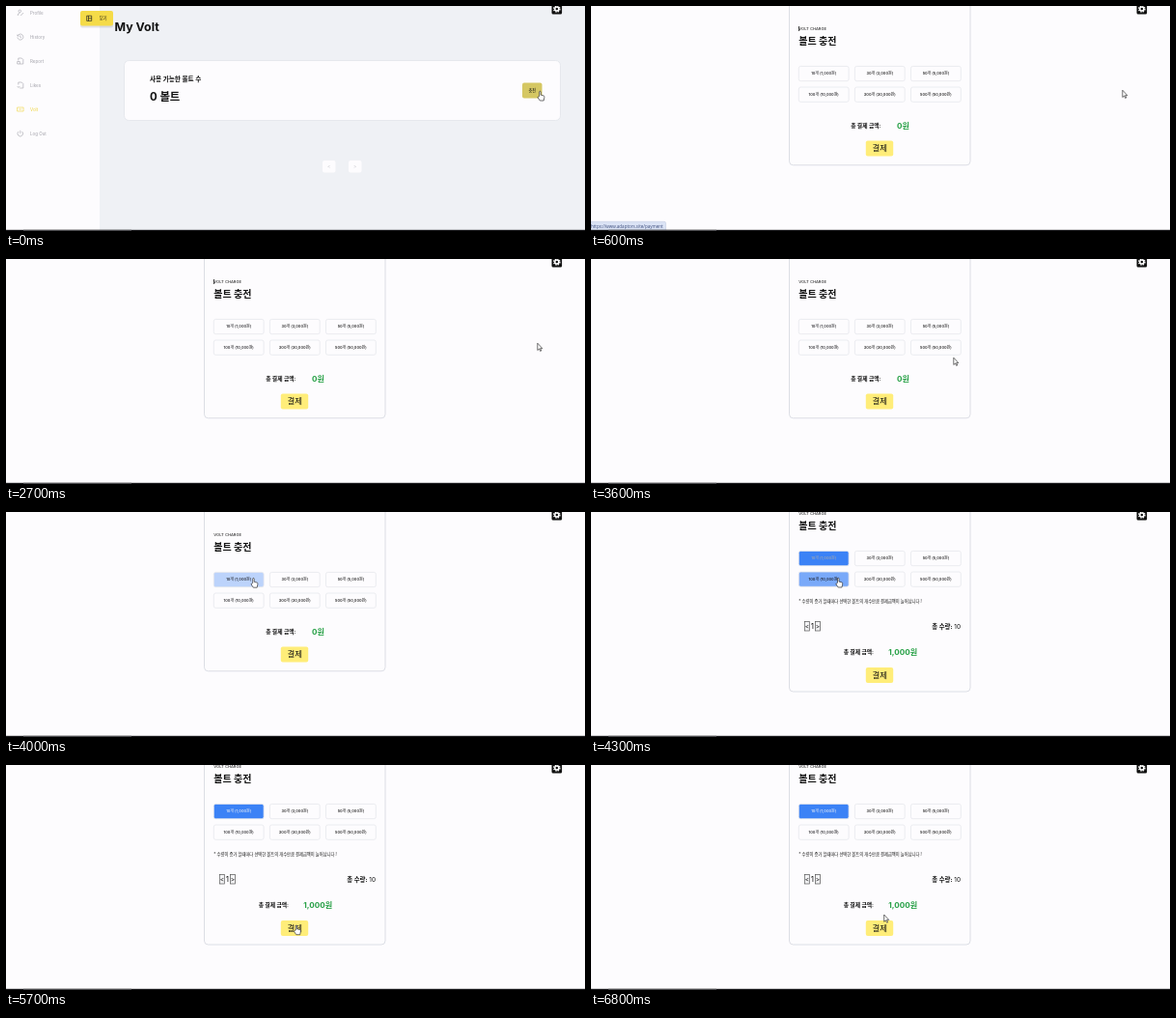
An HTML page for the animation above (8 s loop, 600 px wide and 233 px high).

```html
<!DOCTYPE html>
<html lang="ko">
<head>
<meta charset="utf-8">
<title>My Volt</title>
<style>
html, body { margin: 0; height: 100%; overflow: hidden; background: #fdfcfe; }
svg { display: block; width: 600px; height: 233px; font-family: Inter, 'Noto Sans CJK KR', 'Noto Sans CJK', sans-serif; }
</style>
</head>
<body>
<svg id="stage" viewBox="0 0 600 233"></svg>
<script>
const LOOP = 8000, STEP = 100;
const PAGE_AT = 500, CLICK_AT = 4200;
const BLUE = [59, 130, 246], WHITE = [253, 252, 254], INK = [20, 20, 24];

const text = (x, cy, size, str, attrs = '') =>
  `<text x="${x}" y="${cy + size * .36}" font-size="${size}" fill="#111" ${attrs}>${str}</text>`;
const box = (x, y, w, h, r, fill, stroke = 'none', attrs = '') =>
  `<rect x="${x}" y="${y}" width="${w}" height="${h}" rx="${r}" fill="${fill}" stroke="${stroke}" ${attrs}/>`;
const line = (d, attrs = '') => `<path d="${d}" fill="none" ${attrs}/>`;
const BOLD = 'font-weight="700"', MID = 'text-anchor="middle"';

// Account page
const menu = [
  ['Profile', 'M1 6.5V5.5q0-1.5 2-1.5M3 .5a1.3 1.3 0 1 1 0 2.6a1.3 1.3 0 1 1 0-2.6M4 6.5L6.8 3.5'],
  ['History', 'M.6 1V2.6H2.2M.8 2.4A3 3 0 1 1 .6 4M3.5 2V3.8L4.8 4.5'],
  ['Report', 'M1.5 3V.5H5L6.5 2V6.5H3M.4 4H3V6.5H.4Z'],
  ['Likes', 'M1.5 3V.5H5L6.5 2V6.5H3M.4 4.5L1.7 6L3 4.5'],
  ['Volt', 'M.3 1.5H6.8V5.5H.3ZM3.5 2.5V4.5M1.5 3.5H2M5 3.5H5.6'],
  ['Log Out', 'M3.5 .3V3.4M1.7 1.5A2.8 2.8 0 1 0 5.3 1.5'],
];
const menuItem = ([label, icon], i) => {
  const cy = 7 + i * 25, color = label === 'Volt' ? '#efd53f' : '#a2a2aa';
  return line(icon, `transform="translate(11.3 ${cy - 3.5})" stroke="${color}" stroke-width=".6"`) +
    text(25, cy, 4.5, label, `style="fill:${color}"`);
};
const pager = (x, sign) => box(x, 160, 13.5, 12.5, 2, '#fdfcfe') +
  text(x + 6.75, 166.2, 5, sign, MID + ' style="fill:#c9c9cf"');

const account = `<g id="account">
  ${box(0, 0, 600, 233, 0, '#eff1f5')}
  ${box(0, 0, 97, 233, 0, '#fdfcfe')}
  ${menu.map(menuItem).join('')}
  ${box(77, 6.5, 34, 16, 2, '#000', 'none', 'opacity=".1"')}
  ${box(77, 5, 34, 15.5, 2, '#f5db48')}
  ${line('M83.7 10.2H88.7V15.4H83.7ZM85.5 10.2V15.4M85.5 12.8H88.7', 'stroke="#222" stroke-width=".7"')}
  ${text(97, 12.8, 4.2, '닫기')}
  ${text(112.5, 21.5, 12.4, 'My Volt', BOLD)}
  ${box(122.5, 56.5, 452, 62, 5, '#fdfcfe', '#e0e3e8', 'stroke-width=".7"')}
  ${text(149, 76, 6.6, '사용 가능한 볼트 수', BOLD)}
  ${text(149, 94, 11.4, '0 볼트', BOLD)}
  ${box(535, 79.5, 20.5, 16, 2, '#d5c762')}
  ${text(545.3, 87, 4.2, '충전', MID)}
  ${pager(328, '&lt;')}${pager(355, '&gt;')}
</g>`;

// Payment page
const amounts = [[10, '1,000'], [30, '3,000'], [50, '5,000'], [100, '10,000'], [300, '30,000'], [500, '50,000']];
const option = ([n, won], i) => {
  const x = 215.3 + i % 3 * 58.1, y = i < 3 ? 62.4 : 84;
  return `<g class="option">${box(x, y, 51.8, 15.3, 2, '#fdfcfe', '#e6e8ec', 'stroke-width=".8"')}` +
    text(x + 25.9, y + 7.6, 4, `${n}개 (${won}원)`, MID + ' font-weight="500"') + '</g>';
};
const stepper = (x, sign) => box(x, 113.4, 5, 9.6, 0, '#f4f4f6', '#555', 'stroke-width=".7"') +
  text(x + 2.5, 118.2, 6.5, sign, MID);

const payment = `<g id="payment">
  <rect id="card" x="205.5" y="-30" width="187.5" rx="4" fill="#fdfcfe" stroke="#d9dbe2" stroke-width=".9"/>
  <g id="top">
    ${text(215.3, 23.2, 4.1, 'VOLT CHARGE', 'font-weight="500" style="fill:#333"')}
    ${box(215, 21, .8, 5, 0, '#111', 'none', 'id="caret"')}
    ${text(215.3, 36.2, 10, '볼트 충전', BOLD)}
    ${amounts.map(option).join('')}
  </g>
  <g id="count">
    ${text(215.3, 92.6, 4.25, '* 수량이 증가 할때마다 선택한 볼트의 개수만큼 결제금액이 늘어납니다.!')}
    ${stepper(221.3, '&lt;')}${stepper(232.4, '&gt;')}
    ${text(229.3, 118.2, 8, '1', MID)}
    ${text(383, 118.2, 6.4, '<tspan font-weight="700">총 수량:</tspan> 10', 'text-anchor="end"')}
  </g>
  <g id="bottom">
    ${text(300.5, 123.8, 5.8, '총 결제 금액:', 'id="label" text-anchor="end" ' + BOLD)}
    ${text(317, 124, 8.1, '0원', 'id="total" style="fill:#28a147" ' + BOLD)}
    ${box(284.8, 139.6, 28.4, 15.8, 2, '#ffed79')}
    ${text(299.2, 147.2, 8.4, '결제', MID)}
  </g>
</g>`;

const chrome = `
  ${box(565.5, -3, 10.6, 11.4, 1.5, '#111')}
  <circle cx="570.8" cy="3" r="3.1" fill="none" stroke="#fff" stroke-width="1.4" stroke-dasharray="1.4 1.035"/>
  <circle cx="570.8" cy="3" r="2" fill="none" stroke="#fff" stroke-width="1.5"/>
  <g id="status">${box(-2, 223.3, 79.5, 12, 1.5, '#dbe3f5', '#c3cce0', 'stroke-width=".6"')}
    ${text(0, 228, 4.5, 'https://www.adaptors.site/payment', `style="fill:#3b4c7c;font-family:'Open Sans',sans-serif"`)}</g>
  ${box(0, 231.8, 600, 1.2, 0, '#161619')}${box(18, 231.8, 112, 1.2, 0, '#4a4a4e')}
  <g id="cursor" fill="#fff" stroke="#222" stroke-width=".65" stroke-linejoin="round">
    <path id="arrow" d="M0 0V7.3L1.7 5.8L2.9 8.3L3.9 7.8L2.8 5.4H5Z"/>
    <path id="hand" d="M-.8 5V.7a.75.75 0 0 1 1.5 0V3.8l3 .8q.9.3.7 1.5L3.7 9.7H-.2L-2.4 6.5q-.2-1.1.8-.8z"/>
  </g>`;

document.getElementById('stage').innerHTML = account + payment + chrome;
const $ = id => document.getElementById(id);
const options = document.querySelectorAll('.option');
const show = (id, on) => $(id).setAttribute('visibility', on ? 'visible' : 'hidden');
const shift = (id, y) => $(id).setAttribute('transform', `translate(0 ${y})`);

// Pointer path: time, x, y; "jump" keeps still until the next entry
const path = [
  [0, 553.5, 88.3], [500, 553.5, 88.3], [600, 550.8, 87.2], [3100, 550.8, 87.2],
  [3200, 543, 90], [3400, 462, 99], [3600, 375.8, 102.2], [3800, 305, 89], [4000, 256.5, 68.5],
  [4300, 256.3, 68.3], [4600, 282, 86], [4900, 322, 112], [5000, 336, 142], [5100, 329.7, 164],
  [5200, 316, 167], [5400, 295, 166], [5500, 295, 166], [5600, 305, 166], [5700, 301, 166],
  [5900, 301, 166], [6000, 295, 166], [6300, 295, 166], [6400, 301, 166], [6500, 295, 166],
  [6700, 295, 166], [6800, 303.7, 155], [LOOP, 303.7, 155],
];
const clamp = v => Math.max(0, Math.min(1, v));
const ramp = (t, from, to) => clamp((t - from) / (to - from));
const mix = (a, b, k) => `rgb(${a.map((v, i) => Math.round(v + (b[i] - v) * k))})`;

function pointer(t) {
  const i = path.findIndex(p => p[0] > t);
  const [t0, x0, y0] = path[i - 1], [t1, x1, y1] = path[i];
  const k = (t - t0) / (t1 - t0);
  return [x0 + (x1 - x0) * k, y0 + (y1 - y0) * k];
}

function paint(i, fill, ink) {
  const [rect, label] = options[i].children;
  rect.setAttribute('fill', mix(WHITE, BLUE, fill));
  label.setAttribute('fill', mix(INK, [255, 255, 255], ink));
}

function draw(now) {
  const t = Math.floor(now % LOOP / STEP) * STEP;
  const paying = t >= PAGE_AT, picked = t >= CLICK_AT;

  show('account', !paying);
  show('payment', paying);
  show('count', picked);
  show('caret', paying && (t < 1100 || t >= 1700 && t < 2200 || t >= 2700 && t < 3200));
  $('status').setAttribute('opacity', t < 200 ? 0 : 1 - ramp(t, 800, 1100));

  shift('top', picked ? -22 : 0);
  shift('bottom', picked ? 21.5 : 0);
  $('card').setAttribute('height', picked ? 216 : 194.8);
  $('label').setAttribute('x', picked ? 293 : 300.5);
  $('total').setAttribute('x', picked ? 308.3 : 317);
  $('total').textContent = picked ? '1,000원' : '0원';

  paint(0, ramp(t, 3900, 4200), ramp(t, 4100, 4400) * .95);
  paint(3, picked ? ramp(t, 4100, 4350) * .85 * (1 - ramp(t, 4400, 4700)) : 0, 0);

  const [x, y] = pointer(t);
  const hand = !paying || t >= 4000 && t < 4500 || t >= 5300 && t < 6800;
  $('cursor').setAttribute('transform', `translate(${x} ${y})`);
  $('arrow').setAttribute('display', hand ? 'none' : 'inline');
  $('hand').setAttribute('display', hand ? 'inline' : 'none');
}

const start = performance.now();
(function frame() {
  draw(performance.now() - start);
  requestAnimationFrame(frame);
})();
</script>
</body>
</html>
```
